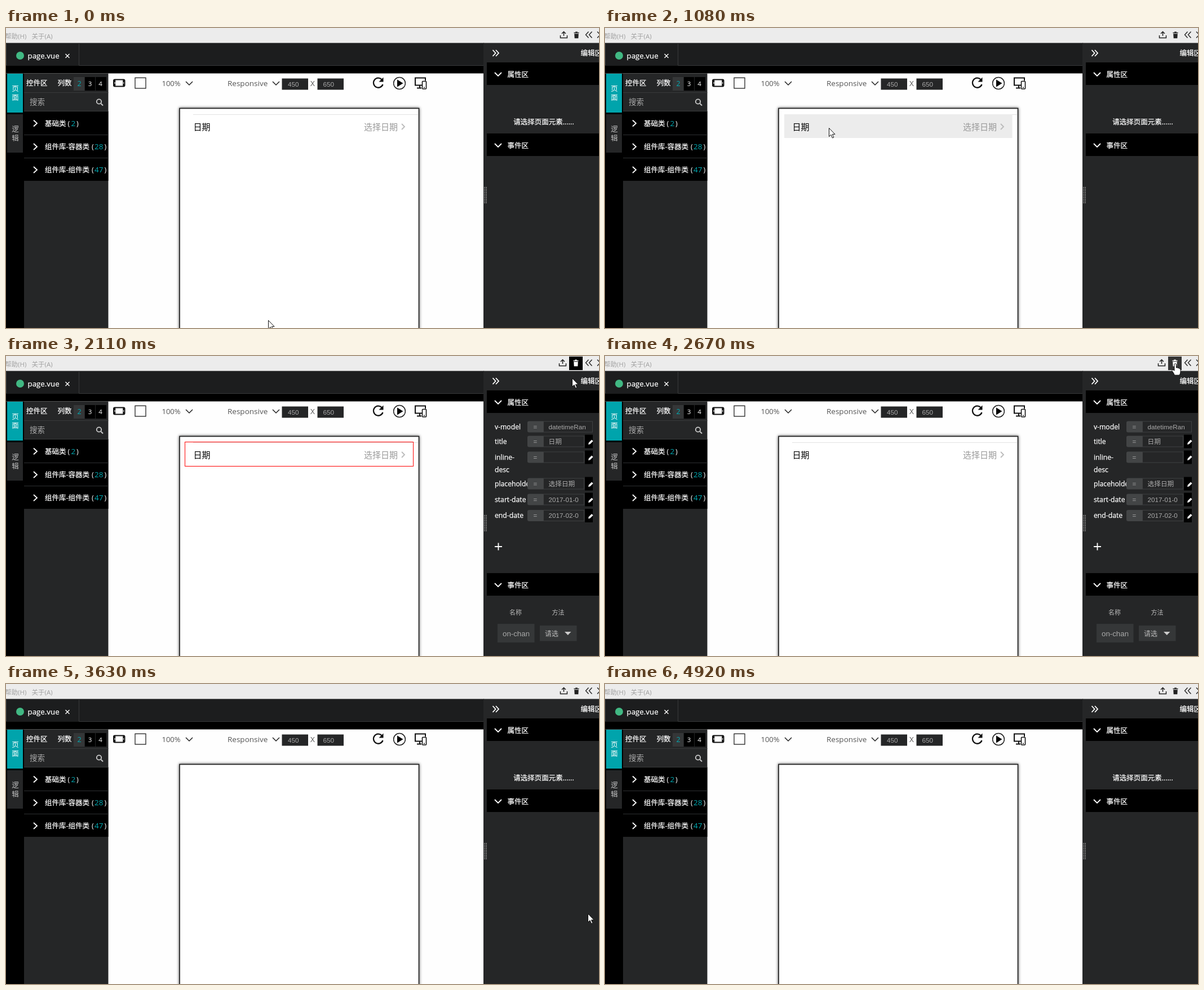
Write an HTML page that moves like this. It is 1052 by 532 pixels and loops after 5330 ms.

```html
<!DOCTYPE html>
<html lang="zh">
<head>
<meta charset="utf-8">
<title>Page editor</title>
<style>
  html, body { margin: 0; width: 100%; height: 100%; overflow: hidden; background: #fff; }
  svg { display: block; width: 1052px; height: 532px; }
  text { font: 12.5px "Open Sans", "Noto Sans CJK SC", "Noto Sans CJK", "Noto Sans", sans-serif; fill: #fff; white-space: pre; }
  .m { font-weight: 500; stroke: #fff; stroke-width: .25; }
  .teal { fill: #00aab3; }
  .arial { font-family: "Liberation Sans", "Noto Sans CJK SC", "Noto Sans CJK", sans-serif; font-size: 11.7px; fill: #aaa; }
  .menu { font-size: 11.5px; fill: #a0a0a0; }
  .tool { font-size: 13.5px; fill: #555; }
  .cell { font-size: 15px; }
  .dim { fill: #999; }
  .col { font-size: 11px; fill: #bbb; }
  .line { fill: none; stroke: #fff; stroke-width: 1.8; }
  .dark { fill: none; stroke: #222; stroke-width: 1.5; }
</style>
</head>
<body>
<svg viewBox="0 0 1052 532" xmlns="http://www.w3.org/2000/svg">
  <defs>
    <path id="right" d="M-3-5.5L3 0L-3 5.5"/>
    <path id="down" d="M-6-3L0 3L6-3"/>
    <path id="trash" d="M-4.5-4.8h9v1.6h-9zM-1.8-6h3.6v1.2h-3.6zM-3.8-2.3h7.6l-.5 8h-6.6z"/>
    <path id="pencil" d="M-4 4.5l.8-3.3L2-4 4.5-1.5-.8 3.7z"/>
    <clipPath id="inputClip"><path d="M881 476h47.500v31H881z"/></clipPath>
  </defs>

  <rect width="1052" height="532" fill="#fefefe"/>
  <rect width="1052" height="27" fill="#ececec"/>
  <text class="menu" x="-2" y="19">帮助(H)</text>
  <text class="menu" x="45.5" y="19">关于(A)</text>

  <!-- file tab -->
  <rect y="26.500" width="848" height="40.500" fill="#1c1d1e"/>
  <rect y="67" width="848" height="13.500" fill="#000"/>
  <path d="M129.500 66.500H847M129.500 28V66M.5 28V66" stroke="#383a3b"/>
  <circle cx="25" cy="49" r="7" fill="#41b883"/>
  <text class="m" x="38.500" y="53.500" style="font-size:13.3px">page.vue</text>
  <path class="line" d="M105.500 46l7 7m0-7l-7 7" style="stroke-width:1.4"/>

  <!-- left side -->
  <rect y="80.500" width="32" height="452" fill="#000"/>
  <rect x="32" y="80.500" width="149.500" height="452" fill="#252627"/>
  <rect x="2" y="81" width="28" height="69" fill="#00a4ac"/>
  <rect x="2" y="153" width="28" height="68" fill="#252627"/>
  <g text-anchor="middle">
    <text x="16.500" y="111.500">页</text><text x="16.500" y="127.500">面</text>
    <text x="16.500" y="183.500" fill-opacity=".7">逻</text><text x="16.500" y="199.500" fill-opacity=".7">辑</text>
  </g>
  <text class="m" x="36" y="102">控件区</text>
  <text class="m" x="91.500" y="102">列数</text>
  <rect x="120" y="87" width="19" height="24" fill="#353738"/>
  <path d="M140 87h18v24h-18zM159 87h19v24h-19z" fill="#000"/>
  <g text-anchor="middle" style="font-weight:600">
    <text class="teal" x="130" y="103" style="font-weight:400">2</text>
    <text x="149" y="103" style="font-size:11.5px">3</text><text x="167.500" y="103" style="font-size:11.5px">4</text>
  </g>
  <path d="M32 114.500H181.500M32 147.500H181.500" stroke="#383a3b"/>
  <text x="42" y="136" style="font-size:13.5px;fill:#aaa">搜索</text>
  <path d="M168.500 134l3.500 3.500" stroke="#ccc" stroke-width="2"/>
  <circle cx="165" cy="130.500" r="4.200" fill="none" stroke="#ccc" stroke-width="1.8"/>
  <rect x="32" y="148" width="149.500" height="123" fill="#000"/>
  <path d="M32 189.500H181.500M32 230.500H181.500" stroke="#2e3031"/>
  <g id="groups"></g>

  <!-- canvas toolbar -->
  <rect x="191" y="91.500" width="19.500" height="12" rx="2" fill="none" stroke="#111" stroke-width="2"/>
  <path d="M193 92v11M208.500 92v11" stroke="#111" stroke-width="2.500"/>
  <path d="M192 97.500h2m13.500 0h2" stroke="#fff" stroke-width="1.5"/>
  <rect class="dark" x="229" y="88.300" width="19" height="18.700" style="stroke-width:1.3"/>
  <text class="tool" x="276.500" y="103" style="font-size:13px">100%</text>
  <use href="#down" class="dark" x="325" y="98"/>
  <text class="tool" x="393" y="103">Responsive</text>
  <use href="#down" class="dark" x="479" y="98"/>
  <path d="M489.500 89.500h46.500v20h-46.500zM552.500 89.500h46.500v20h-46.500z" fill="#252627"/>
  <text class="arial" x="500" y="103.500">450</text>
  <text class="tool" x="540" y="103">X</text>
  <text class="arial" x="562.500" y="103.500">650</text>
  <path d="M666.500 91.200A8.500 8.500 0 1 0 668.500 100" fill="none" stroke="#111" stroke-width="2.300"/>
  <path d="M669.500 87.500v8h-8z" fill="#111"/>
  <circle cx="698" cy="98" r="10.400" class="dark"/>
  <path d="M694 91.500l10.500 6.500-10.500 6.500z" fill="#000"/>
  <path d="M738 101.500h-12V88.500h18v5M734 102v4M729 106.500h8" fill="none" stroke="#111" stroke-width="2"/>
  <rect x="738.500" y="94.500" width="7" height="13.500" rx="1" fill="#fff" stroke="#111" stroke-width="1.600"/>
  <path d="M741 105.500h2" stroke="#111" stroke-width="1.300"/>

  <!-- page preview -->
  <rect x="308" y="142.500" width="424.500" height="430" fill="#fff" stroke="#222" stroke-width="1.700" style="filter:drop-shadow(0 0 2.5px rgba(0,0,0,.7))"/>
  <g id="row">
    <path d="M332 153.500H731" stroke="#e2e2e2"/>
    <rect id="hover" x="318" y="153" width="404.500" height="42" fill="#ececec"/>
    <text class="cell" x="332.500" y="180.500" style="fill:#000">日期</text>
    <text class="cell dim" x="635" y="180.500">选择日期</text>
    <path d="M702 170l5 5-5 5" fill="none" stroke="#bbb" stroke-width="1.800"/>
    <rect id="outline" x="317.500" y="152.500" width="405" height="43" fill="none" stroke="#f00"/>
  </g>

  <!-- right side -->
  <rect x="847" y="26.500" width="205" height="506" fill="#252627"/>
  <path d="M849 282V312M852 282V312" stroke="#999" stroke-width="1.800" stroke-dasharray="1.500 1.500"/>
  <path class="line" d="M863.500 39l5 5.500-5 5.500m5.500-11l5 5.500-5 5.500"/>
  <text class="m" x="1019.500" y="49">编辑区</text>
  <rect x="853" y="61" width="199" height="40" fill="#000"/>
  <use href="#down" class="line" x="873" y="82"/>
  <text class="m" x="889.500" y="86.500">属性区</text>
  <text id="empty" class="m" x="954" y="171" text-anchor="middle">请选择页面元素......</text>
  <g id="props">
    <g id="fields"></g>
    <path class="line" d="M867 338h13M873.500 331.500v13"/>
    <text class="col" x="893" y="458.500">名称</text>
    <text class="col" x="968.500" y="458.500">方法</text>
    <path d="M872 475h65.500v33H872zM947 478h65.500v27.500H947z" fill="#353738"/>
    <text class="arial" x="881" y="496.500" clip-path="url(#inputClip)" style="font-size:13.3px">on-change</text>
    <text x="956" y="496.500" style="font-size:12px;fill:#bbb">请选</text>
    <path d="M991 489h11.500l-5.700 6z" fill="#ccc"/>
  </g>
  <g id="events">
    <rect x="853" y="187" width="199" height="40" fill="#000"/>
    <use href="#down" class="line" x="873" y="208"/>
    <text class="m" x="889.500" y="212.500">事件区</text>
  </g>

  <!-- menu icons -->
  <path id="upload" d="M983.500 13v4.500h12V13M989.500 14V7M986 10l3.500-3.500 3.500 3.500" class="dark"/>
  <rect id="trashBox" x="999" y="1" width="24" height="24"/>
  <use id="bin" href="#trash" x="1012" y="12.500"/>
  <path class="dark" d="M1033.500 6.500l-5 5.500 5 5.500m6-11l-5 5.500 5 5.500M1049 6.500l5 5.500-5 5.500" style="stroke-width:1.4"/>

  <!-- pointers -->
  <g id="pointer">
    <path id="arrow" d="M.5.500V15.500L4 12.200L6.500 18L8.800 17L6.400 11.400H11z" fill="#fff" stroke="#111"/>
    <path id="hand" d="M-2 1.500Q-.2-.8 1.500 1.500V8Q3 6.500 4.500 8.500Q6 7.500 7 9.500Q9 9 9 11.500V15Q9 18 7 21H-1.500Q-3 17-6 13.500Q-6.500 10.500-4 11.500L-2 13z" fill="#fff" stroke="#111"/>
    <g id="denied" fill="#fff" stroke="#d9101a" stroke-width="2.300"><circle r="6.500"/><path d="M-4.500-4.500L4.500 4.500"/></g>
  </g>
</svg>
<script>
const $ = id => document.getElementById(id);
const show = (id, on) => $(id).setAttribute('display', on ? 'inline' : 'none');

// widget groups: name, count, y, x of "(", count and ")"
$('groups').innerHTML = [
  ['基础类', 2, 169, 109.500, 115.500, 125],
  ['组件库-容器类', 28, 210.500, 152, 157, 174.500],
  ['组件库-组件类', 47, 251.500, 152, 157, 174.500]
].map(([name, count, y, open, num, close]) => `
  <use href="#right" class="line" x="52" y="${y}"/>
  <g transform="translate(0 ${y + 4.500})">
    <text class="m" x="69">${name}</text><text x="${open}">(</text>
    <text class="teal" x="${num}" style="font-size:13.5px">${count}</text><text x="${close}">)</text>
  </g>`).join('');

// property fields: label, value, y
$('fields').innerHTML = [
  ['v-model', 'datetimeRan', 125.500],
  ['title', '日期', 151.500],
  ['inline-', '', 179.500],
  ['placeholder', '选择日期', 226.500],
  ['start-date', '2017-01-0', 254.500],
  ['end-date', '2017-02-0', 283]
].map(([label, value, y], i) => `
  <g transform="translate(0 ${y})">
    <text class="m" x="867" y="4" style="font-size:12.2px">${label}</text>
    <path d="M953-10H928q-3 0-3 3V7q0 3 3 3h25z" fill="#434546"/>
    <text class="arial" x="935.500" y="4">=</text>
    <rect x="953.500" y="-9.500" width="${i ? 72 : 87}" height="19" fill="#252627" stroke="#3f4142"/>
    <text class="arial" x="962.500" y="4">${value}</text>
    ${i ? '<rect x="1027" y="-12" width="14" height="24" fill="#000"/><use href="#pencil" x="1037" y="1" fill="#fff"/>' : ''}
  </g>`).join('') + '<text class="m" x="867" y="205.500" style="font-size:12.2px">desc</text>';

// start, end, steps, from, control, to, linear
const moves = [
  [50, 530, 11, [465, 518], [498, 330], [338, 203]],
  [590, 1080, 10, [338, 203], [365, 180], [397, 177]],
  [1600, 1600, 1, [397, 177], [397, 178], [397, 179]],
  [1640, 2110, 10, [397, 179], [680, 250], [1004, 39]],
  [2170, 2520, 7, [1004, 39], [1010, 28], [1012, 13]],
  [2700, 2700, 1, [1012, 13], [1011, 13], [1010, 13.500]],
  [3320, 3740, 10, [1010, 13.500], [1024, 280], [1038, 507]],
  [3960, 4270, 8, [1038, 507], [1031.500, 522], [1025, 537], true],
  [4440, 4920, 11, [991, 540], [968, 474], [944, 540], true]
];

function pointerAt(t) {
  let pos = moves[0][3];
  for (const [start, end, steps, a, c, b, linear] of moves) {
    if (t < start) break;
    const gap = (end - start) / (steps - 1 || 1);
    const k = t >= end ? steps : Math.floor((t - start) / gap) + 1;
    const p = k / steps;
    const s = linear ? p : p * p * (3 - 2 * p);
    pos = a.map((v, i) => (1 - s) ** 2 * v + 2 * s * (1 - s) * c[i] + s * s * b[i]);
  }
  return pos;
}

const LOOP = 5330;

function draw(t) {
  const [x, y] = pointerAt(t);
  const selected = t >= 1200 && t < 2700;
  const onButton = y < 26;
  const denied = onButton && t >= 2700;

  show('row', t < 3320);
  show('hover', t < 1200 && y < 195);
  show('outline', selected && t < 2670);
  show('props', selected);
  show('empty', !selected);
  $('events').setAttribute('transform', `translate(0 ${selected ? 198 : 0})`);

  show('trashBox', selected);
  $('trashBox').setAttribute('fill', onButton ? '#333' : '#000');
  $('bin').setAttribute('fill', selected ? '#fff' : '#222');
  $('bin').setAttribute('x', selected ? 1011 : 1012);
  $('upload').setAttribute('transform', `translate(${selected ? -2 : 0} 0)`);

  show('arrow', !onButton);
  show('hand', onButton && !denied);
  show('denied', denied);
  $('pointer').setAttribute('transform', `translate(${Math.round(x)} ${Math.round(y)})`);
}

function tick() {
  draw(performance.now() % LOOP);
  requestAnimationFrame(tick);
}
tick();
</script>
</body>
</html>
```
